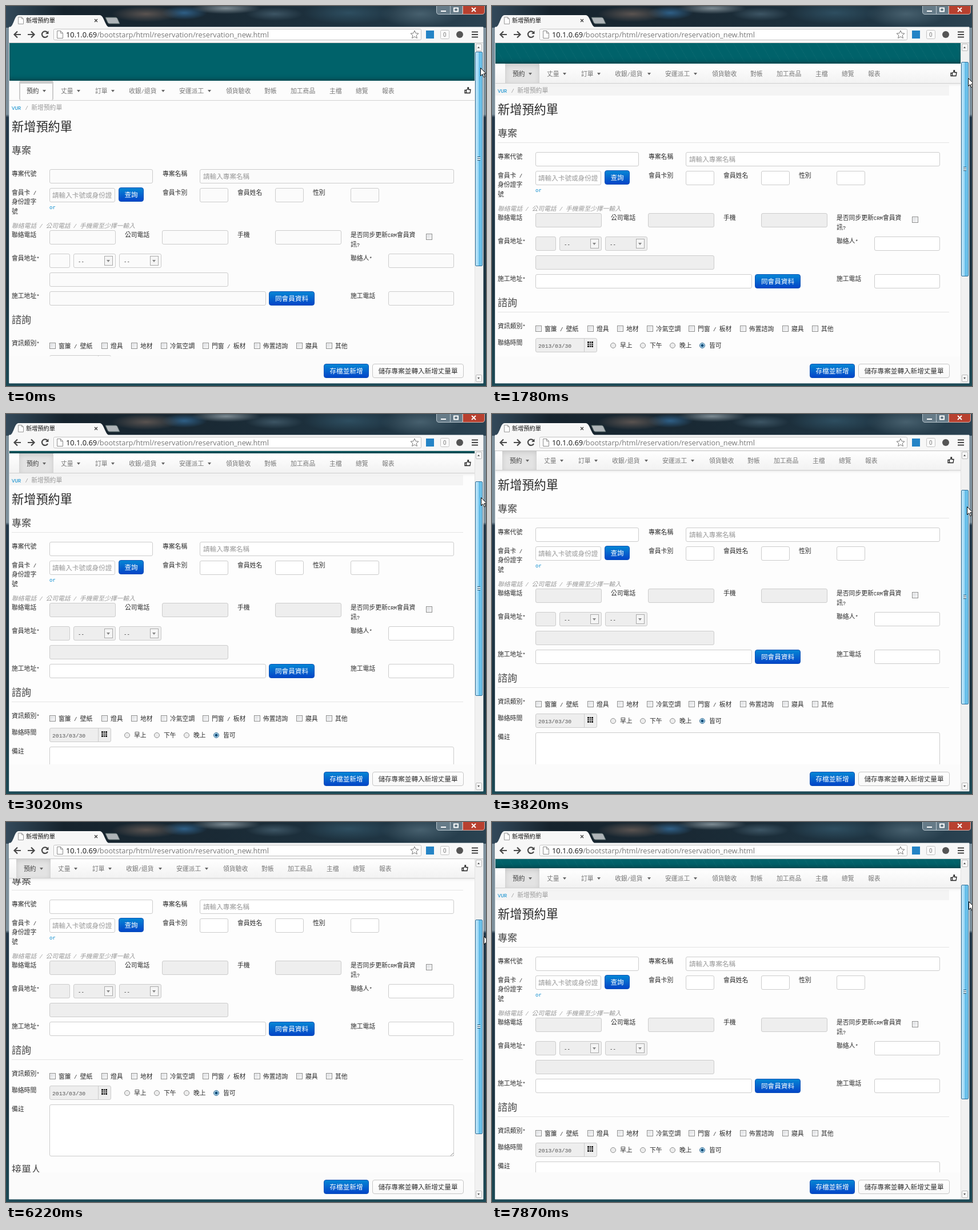
An HTML page for the animation above (8 s loop, 840x666 px).

```html
<!DOCTYPE html>
<html lang="zh-Hant">
<head>
<meta charset="utf-8">
<title>新增預約單</title>
<style>
html, body { margin: 0; width: 100%; height: 100%; overflow: hidden; }
* { box-sizing: border-box; }
#stage {
  position: relative; width: 840px; height: 666px; overflow: hidden;
  font: 10.8px "Noto Sans CJK TC", "Noto Sans CJK", "Noto Sans", sans-serif;
  color: #2b2b2b;
  background:
    radial-gradient(ellipse 60px 14px at 245px 14px, #5a5350, transparent),
    radial-gradient(ellipse 40px 12px at 312px 12px, #2f5f86, transparent),
    radial-gradient(ellipse 60px 10px at 385px 4px, #7d8b93, transparent),
    radial-gradient(ellipse 50px 12px at 470px 14px, #3d5564, transparent),
    radial-gradient(ellipse 80px 20px at 600px 12px, #2e4e60, transparent),
    radial-gradient(ellipse 70px 24px at 725px 14px, #47606e, transparent),
    linear-gradient(90deg, #33495a, #16232d 12%, #1a2a35 45%, #1f3543 80%, #2b4352) 0 0 / 100% 38px no-repeat,
    linear-gradient(#7d909c 0 190px, #24394a 195px, #1b3340 500px, #1c4a56);
}
#stage div, #stage svg, #cursor { position: absolute; }
.t { white-space: pre; line-height: 16px; }
.t i { font: 9px "Liberation Mono", monospace; }
.hint { font-style: italic; color: #999; }
.hint i { font-style: italic; }
.link { color: #08c; }
.soft { color: #999; }
.h1 { font-size: 21.2px; font-weight: 500; }
.h2 { font-size: 17px; color: #444; }
.ph { font-size: 11.6px; color: #999; }
.in { height: 25px; border: 1px solid #ccc; border-radius: 3px; background: #fff; }
.off { background: #eee; }
.hr { left: 10px; width: 790px; height: 1px; background: #e4e4e4; }
.btn {
  height: 25px; border: 1px solid #0a51b8; border-radius: 4px; line-height: 23px; text-align: center;
  font-size: 11.6px; color: #fff; background: linear-gradient(#0586d4, #0445c8); white-space: nowrap;
}
.plain { color: #333; border-color: #c6c6c6; background: linear-gradient(#fff, #f8f8f8); }
.cb { width: 11px; height: 11px; border: 1px solid #8e8f8f; background: linear-gradient(135deg, #d8dade, #fafafa); box-shadow: inset 0 0 0 1px #f4f4f4; }
.rd { width: 10px; height: 10px; border: 1px solid #8e8f8f; border-radius: 50%; background: #ececec; }
.on { border-color: #2c628b; background: radial-gradient(#0c4b78 0 2px, #b5dcf0 3px); }
.drop { width: 15px; height: 17px; border: 1px solid #aaa; background: #f5f5f5; }
.drop::after, .caret {
  content: ""; position: absolute; border: solid transparent; border-width: 4px 3.5px 0; border-top-color: #888;
}
.drop::after { left: 3px; top: 6px; }
.caret { border-top-color: #666; }
#view { inset: 0; clip-path: inset(65px 20px 52px 6px); background: #fdfdfd; }
#page { left: 0; top: 0; width: 820px; height: 900px; }
#band {
  left: 6px; top: 0; width: 814px; height: 131px;
  background: repeating-linear-gradient(60deg, #ffffff08 0 1px, transparent 1px 14px), #00626a;
  box-shadow: inset 0 -7px 8px -5px #003e45;
}
#crumb { left: 6px; top: 169px; width: 794px; height: 18px; background: #f4f4f4; }
#nav { left: 0; top: 0; width: 840px; height: 35px; background: linear-gradient(#fff, #f2f2f2); border-bottom: 1px solid #d2d2d2; box-shadow: 0 1px 5px #0000001a; color: #777; }
#items { left: 0; top: 0; width: 820px; height: 34px; }
#active { left: 23px; top: 0; width: 60px; height: 34px; background: #e3e3e3; box-shadow: inset 0 3px 8px #00000020; }
.first #view { background: #fcfcfc; }
.first #band { background: #00626a; }
.first #crumb, .first .hr { display: none; }
.first .in { background: #fbfbfb; }
.first #nav { background: #fcfcfc; box-shadow: none; }
.first #active { background: #fcfcfc; border: 2px solid #ccc; border-width: 5px 2px 0; border-radius: 3px; box-shadow: none; }
#foot { left: 6px; top: 614px; width: 814px; height: 47px; background: #fbfbfb; }
#bar { left: 820px; top: 65px; width: 15px; height: 596px; background: #f1f1f1; border-left: 1px solid #e2e2e2; }
.arrow { left: 822px; width: 11px; height: 13px; border: 1px solid #bbb; border-radius: 2px; background: #f6f6f6; }
.arrow::after { content: ""; position: absolute; left: 2px; top: 4px; border: solid transparent; border-width: 0 2.5px 3px; border-bottom-color: #555; }
.down { transform: scaleY(-1); }
#thumb { left: 821px; top: 80px; width: 13px; height: 376px; border: 1px solid #2f6f99; border-radius: 2px; background: linear-gradient(90deg, #c4e8fa, #9ad7f5 45%, #58b7e6 55%, #7ccbef); }
#thumb::after { content: ""; position: absolute; left: 3px; top: 183px; width: 5px; height: 7px; background: repeating-linear-gradient(#1e4a66 0 1px, #e4f5fd 1px 3px); }
.url { font: 12.8px/18px "Open Sans", "Noto Sans", sans-serif; color: #777; }
.url b { font-weight: 400; color: #111; }
</style>
</head>
<body>
<div id="stage" class="first">
  <svg width="840" height="666" fill="none">
    <path d="M5.500 661V37H835V661z" fill="#fbfbfb" stroke="#cfd8dd"/>
    <path d="M5 38C14 37 14 16 22 16H164C172 16 173 37 182 38z" fill="#f7f7f7"/>
    <path d="M5 37H835V64H5z" fill="#f7f7f7"/>
    <path d="M5 64.500H835" stroke="#c4c4c4"/>
    <path d="M174 20H192Q194 20 195 22L199 31H181Q179 31 178 29z" fill="#aeb4b8" stroke="#566"/>
    <path d="M21.500 19.500H27.500L30.500 22.500V31.500H21.500zM27.500 19.500V22.500H30.500" fill="#fff" stroke="#999"/>
    <path d="M155 23L160 28M160 23L155 28" stroke="#444" stroke-width="1.400"/>
    <g stroke="#494949" stroke-width="2.200">
      <path d="M26 50H15M20 44.500L14.500 50L20 55.500M38 50H49M44 44.500L49.500 50L44 55.500"/>
      <path d="M72.500 46.500A5.300 5.300 0 1 0 73 52"/>
    </g>
    <path d="M74.500 43.500V49H69z" fill="#494949"/>
    <rect x="83.500" y="40.500" width="643" height="19" rx="2" fill="#fff" stroke="#c2c2c2"/>
    <path d="M89.500 43.500H95.500L99.500 47.500V56.500H89.500zM95.500 43.500V47.500H99.500" fill="#fff" stroke="#888"/>
    <path d="M715 43L717 47.700L722 48.100L718.200 51.400L719.400 56.400L715 53.700L710.600 56.400L711.800 51.400L708 48.100L713 47.700z" fill="#fff" stroke="#777"/>
    <rect x="735" y="43" width="14" height="14" fill="#2484c6"/>
    <rect x="760.500" y="42.500" width="15" height="15" rx="2" fill="#fafafa" stroke="#c4c4c4"/>
    <circle cx="794" cy="50" r="6" fill="#555"/>
    <path d="M815 45.500H826M815 50H826M815 54.500H826" stroke="#444" stroke-width="2"/>
    <path d="M753.500 0V10Q753.500 14.500 758 14.500H799V0" fill="#667b88" stroke="#b9c6ce"/>
    <path d="M799.500 0V14.500H833Q837.500 14.500 837.500 10V0" fill="#b8402f" stroke="#d9b0a8"/>
    <path d="M777.500 0V14" stroke="#b9c6ce"/>
    <path d="M761 9H770M784 3.500H791V9.500H784zM815 3L822 10M822 3L815 10" stroke="#fff" stroke-width="1.900"/>
  </svg>
  <div class="t" style="left:35px;top:17px;font-size:10.200px;color:#111">新增預約單</div>
  <div class="t url" style="left:105px;top:41px"><b>10.1.0.69</b>/bootstarp/html/reservation/reservation_new.html</div>
  <div class="t" style="left:765px;top:42px;font-size:10px;color:#777">0</div>
  <div id="view">
    <div id="page"><div id="band"></div><div id="crumb"></div></div>
    <div id="nav"><div id="items"><div id="active"></div>
      <svg style="left:802px;top:11px" width="12" height="12" fill="none" stroke="#222" stroke-width="1.300"><path d="M1 5.500H3.500V10.500H1zM3.500 5.500L6 3.500V1H7.500V4.500H11L10 10.500H3.500"/></svg>
    </div></div>
  </div>
  <div id="foot"></div>
  <div class="btn" style="left:556px;top:627px;width:79px">存檔並新增</div>
  <div class="btn plain" style="left:641px;top:627px;width:160px">儲存專案並轉入新增丈量單</div>
  <div id="bar"></div>
  <div class="arrow" style="top:66px"></div>
  <div class="arrow down" style="top:646px"></div>
  <div id="thumb"></div>
  <svg id="cursor" style="left:0;top:0" width="14" height="20"><path d="M.5 .5V14.500L3.800 11.500L6 16.800L8.300 15.800L6 10.700H10.300z" fill="#fff" stroke="#000"/></svg>
</div>
<script>
const $ = id => document.getElementById(id);
const stage = $('stage'), page = $('page'), nav = $('nav'), items = $('items');

function add(parent, cls, x, y, w, html = '') {
  const el = document.createElement('div');
  el.className = cls;
  el.style.left = x + 'px';
  el.style.top = y + 'px';
  if (w) el.style.width = w + 'px';
  el.innerHTML = html;
  parent.append(el);
  return el;
}
const mono = s => s.replace(/[ -~]+/g, '<i>$&</i>');
const text = (x, y, s, cls = '', parent = page) => add(parent, 't ' + cls, x, y - 8, 0, mono(s));
const title = (y, s) => { text(10, y, s, 'h2'); add(page, 'hr', 10, y + 17); };
const field = (x, y, w, off) => add(page, 'in' + (off ? ' off' : ''), x, y, w);
const button = (x, y, w, s) => add(page, 'btn', x, y, w, s);
const check = (x, y) => add(page, 'cb', x, y - 5);
function select(x, y) {
  field(x, y, 74, true);
  add(page, 'drop', x + 54, y + 4);
  text(x + 8, y + 12, '--');
}

// Menu
[[36, '預約', 64], [96, '丈量', 124], [156, '訂單', 184], [215, '收銀/退貨', 272], [303, '安運派工', 353],
 [385, '領貨驗收'], [452, '對帳'], [498, '加工商品'], [566, '主檔'], [612, '總覽'], [658, '報表']
].forEach(([x, s, caret]) => {
  const el = text(x, 17, s, '', items);
  if (caret) {
    add(items, 'caret', caret, 16);
    if (x < 40) el.style.color = '#444';
  }
});

// Heading
text(10, 177, 'VUR', 'link');
text(28, 177, ' / 新增預約單', 'soft');
text(10, 210, '新增預約單', 'h1');

// Project
title(252, '專案');
text(10, 293, '專案代號');
field(76, 286, 181);
text(274, 293, '專案名稱');
field(339, 286, 445);
text(345, 298, '請輸入專案名稱', 'ph');
['會員卡 /', '身份證字', '號'].forEach((s, i) => text(10, 326 + i * 16.4, s));
field(76, 319, 115);
text(81, 331, '請輸入卡號或身份證', 'ph');
button(197, 318, 44, '查詢');
text(76, 351, 'or', 'link');
[[274, '會員卡別', 339], [405, '會員姓名', 471], [537, '性別', 603]].forEach(([x, s, fx]) => {
  text(x, 326, s);
  field(fx, 319, 50);
});
text(10, 384, '聯絡電話 / 公司電話 / 手機需至少擇一輸入', 'hint');
[[10, '聯絡電話', 76], [208, '公司電話', 273], [405, '手機', 471]].forEach(([x, s, fx]) => {
  text(x, 400, s);
  field(fx, 393, 116, true);
});
text(603, 400, '是否同步更新CRM會員資');
text(603, 417, '訊?');
check(735, 404);
text(10, 441, '會員地址*');
field(76, 434, 36, true);
select(118, 434);
select(198, 434);
text(603, 441, '聯絡人*');
field(669, 434, 115);
field(76, 467, 313, true);
text(10, 507, '施工地址*');
field(76, 500, 379);
button(460, 500, 80, '同會員資料');
text(603, 507, '施工電話');
field(669, 500, 115);

// Enquiry
title(549, '諮詢');
text(10, 590, '資訊類別*');
[[76, '窗簾 / 壁紙'], [167, '燈具'], [219, '地材'], [271, '冷氣空調'], [344, '門窗 / 板材'],
 [434, '佈置諮詢'], [508, '寢具'], [560, '其他']].forEach(([x, s]) => {
  check(x, 595);
  text(x + 16, 594.5, s);
});
text(10, 619, '聯絡時間');
field(76, 612, 108, true);
add(page, '', 161, 612, 1).style.cssText += 'height:25px;background:#ccc';
text(81, 624, '2013/03/30').firstChild.style.cssText = 'font-size:9.700px;color:#555';
for (let i = 0; i < 9; i++)
  add(page, '', 167 + i % 3 * 3.5, 618 + (i / 3 | 0) * 3.5, 2.6).style.cssText += 'height:2.600px;background:#222';
['早上', '下午', '晚上', '皆可'].forEach((s, i) => {
  add(page, 'rd' + (i === 3 ? ' on' : ''), 207 + i * 52, 620);
  text(224 + i * 52, 624, s);
});
text(10, 652, '備註');
field(76, 645, 708).style.height = '91px';
add(page, '', 776, 728, 7).style.cssText +=
  'height:7px;background:repeating-linear-gradient(135deg,#888 0 1px,#fff 1px 3px);clip-path:polygon(100% 0,100% 100%,0 100%)';
title(758, '接單人');

// Scroll knots: time, offset, screen updates until the next knot
const LOOP = 8000;
const scroll = [
  [0, 0, 1], [270, 1, 6], [1220, 14, 1], [1360, 18, 3], [1780, 30, 1], [1900, 34, 3], [2350, 46, 1],
  [2500, 49, 4], [3020, 62, 1], [3160, 66, 2], [3460, 75, 1], [3580, 79, 2], [3820, 87, 1], [3970, 93, 5],
  [4600, 125, 1], [4750, 131, 2], [5020, 143, 1], [5140, 147, 4], [5740, 153, 1], [5910, 150, 1],
  [6220, 150, 2], [6510, 138, 1], [6790, 130, 7], [7720, 58, 1], [7870, 50, 1], [LOOP, 50, 1]
];
const drift = [[0, 830], [1780, 833], [3020, 831], [3820, 831], [5020, 834], [6220, 836], [7870, 834], [LOOP, 834]];

function sample(knots, t) {
  let i = 0;
  while (i < knots.length - 2 && t >= knots[i + 1][0]) i++;
  const [t0, v0, n] = knots[i], [t1, v1] = knots[i + 1];
  let k = (t - t0) / (t1 - t0);
  if (n) k = Math.floor(k * n + 1e-6) / n;
  return v0 + (v1 - v0) * k;
}

function draw(now) {
  const t = now % LOOP;
  const s = Math.round(sample(scroll, t));
  const fixed = s >= 66;
  stage.classList.toggle('first', t < 270);
  page.style.transform = `translateY(${-s}px)`;
  nav.style.transform = `translateY(${fixed ? 64 : 131 - s}px)`;
  items.style.transform = `translateX(${fixed ? -5 : 0}px)`;
  $('thumb').style.transform = `translateY(${Math.round(s * 0.605)}px)`;
  $('cursor').style.transform = `translate(${Math.round(sample(drift, t))}px, ${Math.round(108 + s * 0.615)}px)`;
}

const start = performance.now();
function tick() {
  draw(performance.now() - start);
  requestAnimationFrame(tick);
}
tick();
</script>
</body>
</html>
```
